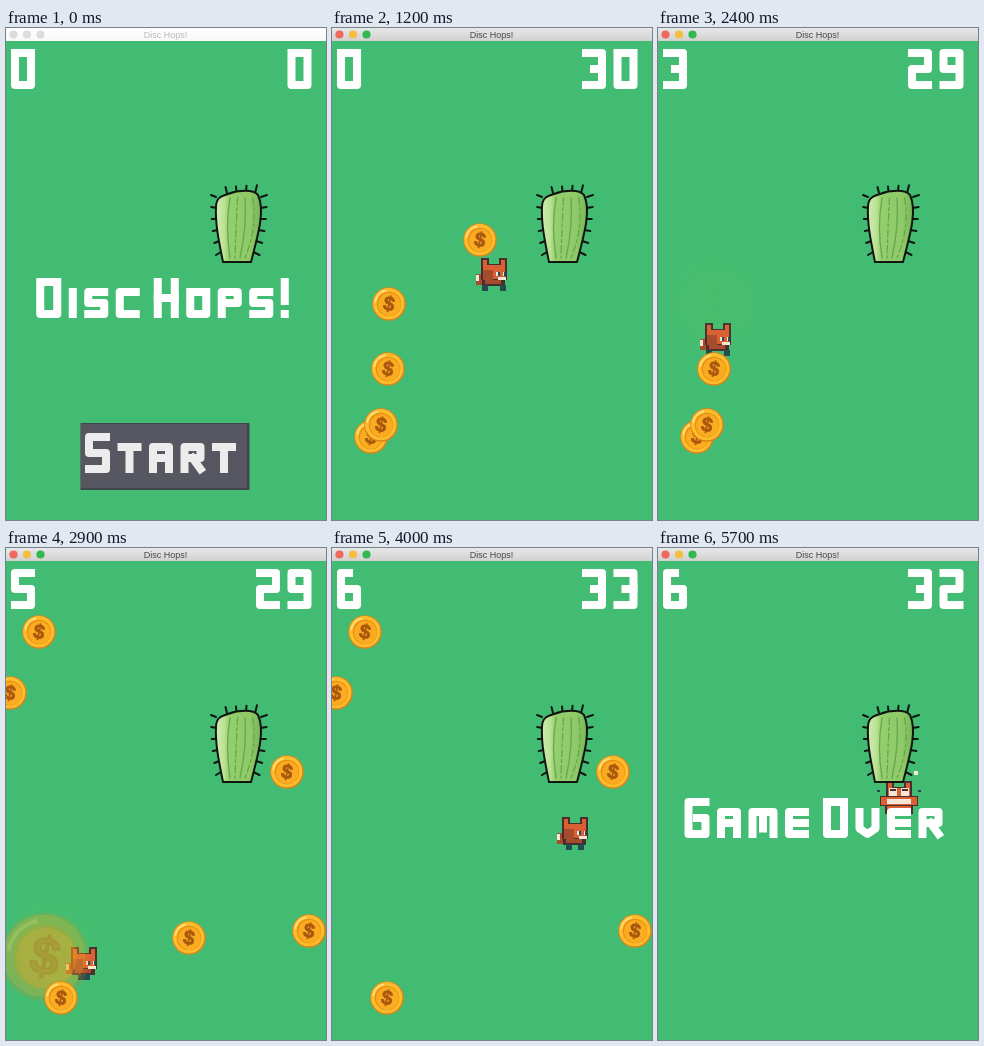
Animation, 320 px wide and 492 px high, one loop 5.8 s. Source, as an HTML page with a canvas:

```html
<!DOCTYPE html>
<html lang="en">
<head>
<meta charset="utf-8">
<title>Disc Hops!</title>
<style>
html, body { margin: 0; width: 100%; height: 100%; overflow: hidden; background: #43bc73; }
canvas { display: block; width: 320px; height: 492px; }
</style>
</head>
<body>
<canvas id="stage" width="320" height="492" role="img" aria-label="Disc Hops! A fox collects coins until it hits a cactus. Game Over"></canvas>
<script>
const ctx = document.getElementById('stage').getContext('2d');
const NAME = 'Disc Hops!';
const LOOP = 5800, STEP = 100;
const ACTIVE = 400, START = 1100, LEVEL2 = 2700, BONUS = 3900, OVER = 4200;
const POP = 300, SPEED = 0.245, REACH = 34;

// Block lettering: strokes on a grid 2 wide and 4 high
const GLYPHS = {
  0: '00 20 24 04 00 20', 1: '00 10 14', 2: '00 20 22 02 04 24',
  3: '00 20 24 04|12 22', 4: '00 02 22|20 24', 5: '20 00 02 22 24 04',
  6: '10 00 04 24 22 02', 7: '00 20 24', 8: '00 20 24 04 00 20|02 22',
  9: '04 24 20 00 02 22', A: '04 00 20 24|02 22', C: '20 00 04 24',
  D: '00 20 24 04 00 20', E: '20 00 04 24|02 22', G: '20 00 04 24 22 12',
  H: '00 04|20 24|02 22', I: '00 04', M: '04 00 20 24|10 13',
  O: '00 20 24 04 00 20', P: '04 00 20 22 02', R: '04 00 20 22 02|12 24',
  S: '20 00 02 22 24 04', T: '00 20|10 14', V: '00 03 14 23 20'
};
const GAP = 7.5, SPACE = 6.5, PEN = 8;

function glyphWidth(ch, small) {
  if (ch === ' ') return SPACE - GAP;
  if (ch === 'I' || ch === '!') return 8;
  if (ch === '1') return 17;
  if (ch === 'M') return 29;
  return small || /\d/.test(ch) ? 24 : 25;
}

function letters(text) {
  return [...text].map(c => {
    const small = /[a-z]/.test(c);
    const ch = c.toUpperCase();
    return { ch, small, w: glyphWidth(ch, small) };
  });
}

function drawGlyph({ ch, small, w }, x, y) {
  const half = PEN / 2, h = small ? 30 : 40, top = y + 40 - h;
  if (ch === ' ') return;
  if (ch === '!') {
    ctx.fillRect(x, y, 8, 27);
    ctx.fillRect(x, y + 32, 8, 8);
    return;
  }
  const cols = ch === '1' ? 1 : 2;
  for (const line of GLYPHS[ch].split('|')) {
    ctx.beginPath();
    for (const p of line.split(' '))
      ctx.lineTo(x + half + p[0] * (w - PEN) / cols, top + half + p[1] * (h - PEN) / 4);
    ctx.stroke();
  }
}

function blockText(text, x, y, align = 0, color = '#fff') {
  const list = letters(text);
  const total = list.reduce((sum, g) => sum + g.w + GAP, -GAP);
  x -= total * align;
  ctx.save();
  ctx.strokeStyle = ctx.fillStyle = color;
  ctx.lineWidth = PEN;
  ctx.lineJoin = 'round';
  ctx.lineCap = 'square';
  for (const g of list) {
    drawGlyph(g, x, y);
    x += g.w + GAP;
  }
  ctx.restore();
}

function disc(x, y, r, color) {
  ctx.fillStyle = color;
  ctx.beginPath();
  ctx.arc(x, y, r, 0, Math.PI * 2);
  ctx.fill();
}

function titleBar(active) {
  const g = ctx.createLinearGradient(0, 0, 0, 13);
  g.addColorStop(0, active ? '#e9e8e9' : '#fff');
  g.addColorStop(1, active ? '#d2d1d2' : '#f8f8f8');
  ctx.fillStyle = g;
  ctx.fillRect(0, 0, 320, 13);
  const lights = active ? ['#f0685e', '#f5bd42', '#31b850'] : Array(3).fill('#dcdcdc');
  lights.forEach((c, i) => disc(7.5 + i * 13.5, 6.5, 4.1, c));
  ctx.fillStyle = active ? '#484848' : '#b9b9b9';
  ctx.font = '9px "Liberation Sans", Arial, sans-serif';
  ctx.textAlign = 'center';
  ctx.textBaseline = 'alphabetic';
  ctx.fillText(NAME, 159.5, 10);
}

function button(active) {
  ctx.fillStyle = '#41464d';
  ctx.fillRect(74.5, 395, 169, 67);
  ctx.fillStyle = active ? '#625e6b' : '#565760';
  ctx.fillRect(75, 396, 166, 64);
  blockText('Start', 79, 405, 0, active ? '#fff' : '#ececec');
}

function bodyPath() {
  ctx.beginPath();
  ctx.moveTo(217, 234);
  ctx.bezierCurveTo(213, 214, 209, 195, 210, 179);
  ctx.bezierCurveTo(210, 170, 215, 168, 222, 166);
  ctx.bezierCurveTo(232, 162, 248, 161, 252, 167);
  ctx.bezierCurveTo(259, 182, 253, 204, 245, 234);
  ctx.closePath();
}

function spikes() {
  ctx.beginPath();
  const spike = (x, y, dx, dy) => {
    ctx.moveTo(x, y);
    ctx.lineTo(x + dx, y + dy);
  };
  for (let i = 0; i < 6; i++) {
    const y = 169 + i * 11, tilt = i - 2;
    spike(210 + i * i * 0.2, y, -5, tilt);
    spike(255 - i * i * 0.3, y, 6, tilt);
  }
  for (let i = 0; i < 4; i++) spike(221 + i * 9.5, 165 - i * 0.6, i - 1.5, -6);
  ctx.stroke();
}

function cactus() {
  ctx.save();
  ctx.lineCap = 'round';
  ctx.strokeStyle = '#10150f';
  ctx.lineWidth = 2;
  spikes();
  const g = ctx.createLinearGradient(209, 0, 256, 0);
  g.addColorStop(0, '#d3ecb4');
  g.addColorStop(0.2, '#bbe194');
  g.addColorStop(0.3, '#94cf6d');
  g.addColorStop(0.75, '#8fca68');
  g.addColorStop(1, '#74b457');
  bodyPath();
  ctx.fillStyle = g;
  ctx.fill();
  ctx.strokeStyle = '#67a64d';
  ctx.lineWidth = 1.3;
  for (let i = 0; i < 4; i++) {
    ctx.setLineDash(i % 2 ? [7, 3, 3, 3] : []);
    ctx.beginPath();
    ctx.moveTo(224 + i * 7.5, 170);
    ctx.quadraticCurveTo(219 + i * 11, 198, 224 + i * 5, 230);
    ctx.stroke();
  }
  ctx.setLineDash([]);
  bodyPath();
  ctx.strokeStyle = '#10150f';
  ctx.lineWidth = 2;
  ctx.stroke();
  ctx.restore();
}

// Fox route: constant speed between waypoints x, y, with an optional departure time
const ROUTE = [
  [160, 246, 1420], [160, 235, 1675], [58, 235], [58, 415], [197, 415], [241, 371], [241, 249]
];

function foxAt(t) {
  let [x, y, time] = ROUTE[0];
  for (const [nx, ny, depart] of ROUTE.slice(1)) {
    if (t < time) return { x, y };
    const dist = Math.hypot(nx - x, ny - y);
    const p = (t - time) * SPEED / dist;
    if (p < 1) return { x: x + (nx - x) * p, y: y + (ny - y) * p, moving: true, left: nx < x };
    time = depart || time + dist / SPEED;
    [x, y] = [nx, ny];
  }
  return { x, y };
}

function blocks(color, ...rects) {
  ctx.fillStyle = color;
  for (const r of rects) ctx.fillRect(...r);
}

// A block and its mirror image
function pair(color, x, y, w, h) {
  blocks(color, [x, y, w, h], [-x - w, y, w, h]);
}

const DARK = '#4b2d2e', RED = '#d95f35', BROWN = '#a54c2e', CREAM = '#f5e6d5', TEAL = '#254c50';

function head() {
  pair(DARK, 5, -16, 8, 9);
  blocks(DARK, [-13, -10, 26, 16]);
  pair(RED, 7, -14, 4, 7);
  blocks(RED, [-11, -9, 22, 14]);
}

function runner(stride) {
  blocks(BROWN, [-16, 0, 6, 11]);
  blocks(CREAM, [-16, 1, 3, 6]);
  blocks(DARK, [-10, 6, 23, 6]);
  ctx.translate(2, 0);
  head();
  blocks(BROWN, [-11, -4, 10, 10], [-9, 6, 16, 4]);
  blocks(CREAM, [2, -2, 4, 4], [9, -2, 3, 4], [4, 3, 8, 3]);
  blocks(TEAL, [4, -2, 2, 4], [10, -2, 2, 4], [-12 + stride, 11, 6, 6], [6 - stride, 11, 6, 6]);
}

function hurt() {
  head();
  pair(CREAM, 2, -9, 8, 8);
  pair(DARK, 3, -8, 6, 2);
  blocks(DARK, [-19, -1, 38, 10], [-14, 9, 28, 8]);
  blocks(RED, [-18, 0, 36, 8], [-12, 9, 24, 6]);
  blocks(CREAM, [-12, 2, 24, 5], [15, -26, 4, 4]);
  pair(TEAL, 19, -7, 3, 2);
}

function fox(t) {
  const f = foxAt(t);
  ctx.save();
  ctx.translate(Math.round(f.x), Math.round(f.y));
  if (f.left) ctx.scale(-1, 1);
  if (t >= OVER) hurt();
  else runner(f.moving ? t / STEP % 3 * 3 : 0);
  ctx.restore();
}

function makeCoin(x, y, born) {
  let taken = born;
  const far = () => {
    const f = foxAt(taken);
    return Math.hypot(f.x - x, f.y - y) > REACH;
  };
  while (taken < OVER && far()) taken += 5;
  return { x, y, born, taken };
}

const COINS = [
  ...[[148, 212], [57, 276], [56, 341], [39, 409], [49, 397]].map(([x, y]) => makeCoin(x, y, START)),
  ...[[33, 84], [4, 145], [281, 224], [303, 383], [55, 450], [183, 390]].map(([x, y]) => makeCoin(x, y, LEVEL2))
];

const easeInOut = p => p < 0.5 ? 2 * p * p : 1 - 2 * (1 - p) * (1 - p);

function drawCoin({ x, y, born, taken }, t) {
  if (t < born || t >= taken + POP || t >= OVER) return;
  const p = easeInOut(Math.max(0, (t - taken) / POP));
  ctx.save();
  ctx.globalAlpha = 1 - p;
  ctx.translate(x, y);
  ctx.scale(1 + 2 * p, 1 + 2 * p);
  disc(0, 0, 16.8, '#d9851a');
  disc(-0.3, -0.4, 15.6, '#fdbd2d');
  disc(0, 0, 12.3, '#e88e14');
  disc(0.4, 0.5, 11.4, '#fbab20');
  ctx.strokeStyle = '#ffe48c';
  ctx.lineWidth = 1.6;
  ctx.beginPath();
  ctx.arc(0, 0, 14, 3.3, 4.5);
  ctx.stroke();
  ctx.rotate(0.2);
  ctx.font = 'bold 20px "Liberation Sans", Arial, sans-serif';
  ctx.textAlign = 'center';
  ctx.textBaseline = 'middle';
  ctx.strokeStyle = ctx.fillStyle = '#a9570f';
  ctx.lineWidth = 0.7;
  ctx.strokeText('$', 0, 1);
  ctx.fillText('$', 0, 1);
  ctx.restore();
}

function score(t) {
  return COINS.filter(c => c.taken <= t && c.taken < OVER).length;
}

function timeLeft(t) {
  if (t < START) return 0;
  const seconds = Math.floor((Math.min(t, OVER) - START) / 1000);
  return 30 - seconds + (t >= BONUS ? 5 : 0);
}

function draw(t) {
  ctx.fillStyle = '#43bc73';
  ctx.fillRect(0, 0, 320, 492);
  if (t >= START) fox(t);
  COINS.forEach(c => drawCoin(c, t));
  cactus();
  blockText(String(score(t)), 5, 21);
  blockText(String(timeLeft(t)), 305.5, 21, 1);
  if (t < START) {
    blockText(NAME, 156.5, 250, 0.5);
    button(t >= ACTIVE);
  } else if (t >= OVER) {
    blockText('Game Over', 155.5, 250, 0.5);
  }
  titleBar(t >= ACTIVE);
}

const begin = performance.now();
function tick(now) {
  const t = Math.max(0, now - begin) % LOOP;
  draw(Math.floor(t / STEP) * STEP);
  requestAnimationFrame(tick);
}
draw(0);
requestAnimationFrame(tick);
</script>
</body>
</html>
```
